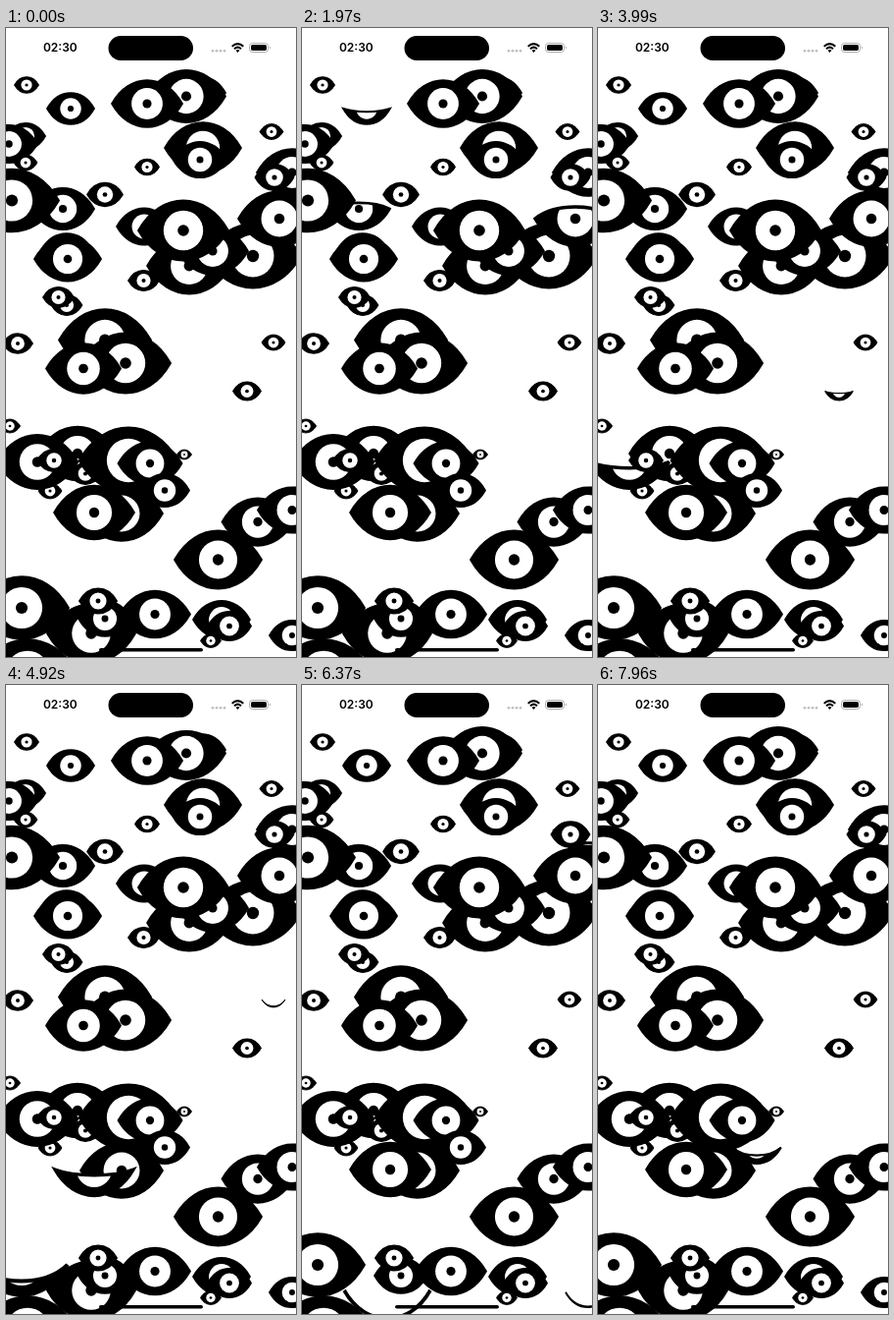
An HTML page with a canvas that plays this animation: 296x640 px, repeating every 8 s.

```html
<!DOCTYPE html>
<html lang="en">
<head>
<meta charset="utf-8">
<title>Blinking eyes</title>
<style>
  html, body { margin: 0; width: 100%; height: 100%; overflow: hidden; background: #fff; }
  canvas, svg { position: absolute; left: 0; top: 0; width: 296px; height: 640px; }
</style>
</head>
<body>
<canvas id="stage" width="296" height="640"></canvas>
<svg viewBox="0 0 296 640">
  <text x="55.300" y="24.300" text-anchor="middle" font-family="Inter, sans-serif" font-weight="600" font-size="12">02:30</text>
  <rect x="104.500" y="8" width="86.500" height="25" rx="12.500"/>
  <g fill="#bbb">
    <circle cx="211" cy="23.200" r="1.300"/><circle cx="215" cy="23.200" r="1.300"/>
    <circle cx="219" cy="23.200" r="1.300"/><circle cx="223" cy="23.200" r="1.300"/>
  </g>
  <g fill="none" stroke="#000" stroke-width="2">
    <path d="M230.700 18.800Q236.500 13.400 242.300 18.800M233 21.200Q236.500 18 240 21.200"/>
  </g>
  <path d="M234.500 22.800Q236.500 21.200 238.500 22.800L236.500 25Z"/>
  <rect x="248.500" y="15.500" width="19" height="9" rx="3" fill="none" stroke="#aaa"/>
  <rect x="250" y="17" width="16" height="6" rx="1.800"/>
  <path d="M269 18.500Q271 20 269 21.500Z" fill="#aaa"/>
  <rect x="95" y="631" width="106" height="3.600" rx="1.800"/>
</svg>
<script>
const LOOP = 8000, BLINK = 400;
const ctx = document.getElementById('stage').getContext('2d');
ctx.miterLimit = 3;
let now = 0;

// The picture advances in uneven steps: [first change, last change, steps].
const bursts = [
  [90, 590, 7], [850, 1650, 10], [1720, 2470, 10], [2540, 2680, 3], [2750, 3340, 8],
  [3410, 3560, 3], [3990, 3990, 1], [4230, 4230, 1], [4390, 5180, 11], [5260, 5710, 7],
  [5950, 5950, 1], [6120, 6600, 7], [6820, 7510, 10], [7660, 7740, 2], [7960, 7960, 1]
];

function steppedTime(t) {
  let shown = 0;
  for (const [first, last, steps] of bursts) {
    if (t < first) break;
    const gap = (last - first) / (steps - 1) || 1;
    shown = Math.min(last, first + Math.floor((t - first) / gap + 1e-6) * gap);
  }
  return shown;
}

function closedAmount(starts) {
  const start = starts.find(s => now > s && now < s + BLINK);
  return start === undefined ? 0 : Math.sin(Math.PI * (now - start) / BLINK) ** 2;
}

function disc(x, y, r, color) {
  ctx.fillStyle = color;
  ctx.beginPath();
  ctx.arc(x, y, r, 0, 2 * Math.PI);
  ctx.fill();
}

// The upper lid bends down onto the lower one, clipping the eyeball.
function eye(x, y, w, ...blinks) {
  const tip = w * 0.477, shoulder = w * 0.24, bend = w * 0.42;
  const lid = bend * (2 * closedAmount(blinks) - 1);
  const outline = new Path2D();
  outline.moveTo(x - tip, y);
  outline.bezierCurveTo(x - shoulder, y + lid, x + shoulder, y + lid, x + tip, y);
  outline.bezierCurveTo(x + shoulder, y + bend, x - shoulder, y + bend, x - tip, y);
  outline.closePath();

  ctx.save();
  ctx.fillStyle = '#000';
  ctx.fill(outline);
  ctx.clip(outline);
  disc(x, y, w * 0.215, '#fff');
  disc(x, y, w * 0.062, '#000');
  ctx.restore();
  ctx.lineWidth = w * 0.04;
  ctx.stroke(outline);
}

function drawEyes() {
  // top
  eye(21, 58, 26);
  eye(66, 82, 50, 1857);
  eye(200, 66, 50);
  eye(184, 69.5, 82, 2750, 4500);
  eye(144, 77, 74);
  eye(201, 122, 80);
  eye(198, 134, 57, 5510);
  eye(144, 141.5, 26);
  eye(271, 105.5, 25, 810);
  eye(292, 147, 74, 6100);
  eye(274, 152, 41);

  // upper left
  eye(20, 110, 42, 3160);
  eye(3, 118, 60, 30);
  eye(20, 137, 25);
  eye(58, 184, 66, 1889);
  eye(6, 175.5, 98, 1200, 2800);
  eye(101, 169.5, 38, 2606);
  eye(62, 227, 56);
  eye(63, 235, 70, 4160);

  // upper right cluster
  eye(141, 202, 58);
  eye(252, 232, 100);
  eye(187, 242, 88);
  eye(211, 227, 74);
  eye(181, 206, 94, 2900, 6936);
  eye(279, 194, 86, 1899);
  eye(140.5, 257, 33, 1150);

  // middle
  eye(62, 282, 33);
  eye(53.5, 274, 33, 1560, 6640);
  eye(12, 321, 32, 5597);
  eye(273, 320, 25, 4700);
  eye(246, 369.5, 30, 3875);
  eye(101, 317.5, 96);
  eye(122, 341, 94, 5880);
  eye(79, 346.5, 78);

  // lower left cluster
  eye(4, 405, 22, 7080);
  eye(45, 471, 25);
  eye(73, 433, 84, 3200);
  eye(81, 453.5, 34, 7560);
  eye(32, 441.5, 85, 2050, 3875);
  eye(49, 440, 36);
  eye(125, 440, 103);
  eye(147, 443, 67);
  eye(182, 434, 16);
  eye(162, 470.5, 52, 7827);
  eye(118, 494, 86);
  eye(90, 493, 84, 4750);

  // bottom
  eye(257, 502.5, 75);
  eye(292, 490.5, 72, 120, 1000);
  eye(216.5, 541, 91);
  eye(22, 656, 104, 100);
  eye(16, 590, 98, 900, 4600);
  eye(87, 616, 92, 1100, 4450, 6150);
  eye(152, 596.5, 74, 2850);
  eye(101, 601, 56, 7100);
  eye(94, 583, 40);
  eye(220, 602, 60, 6940);
  eye(228, 608.5, 46);
  eye(209, 623.5, 22);
  eye(292, 618, 48, 180, 6180);
}

function frame(time) {
  now = steppedTime(time % LOOP);
  ctx.clearRect(0, 0, 296, 640);
  drawEyes();
  requestAnimationFrame(frame);
}
requestAnimationFrame(frame);
</script>
</body>
</html>
```
